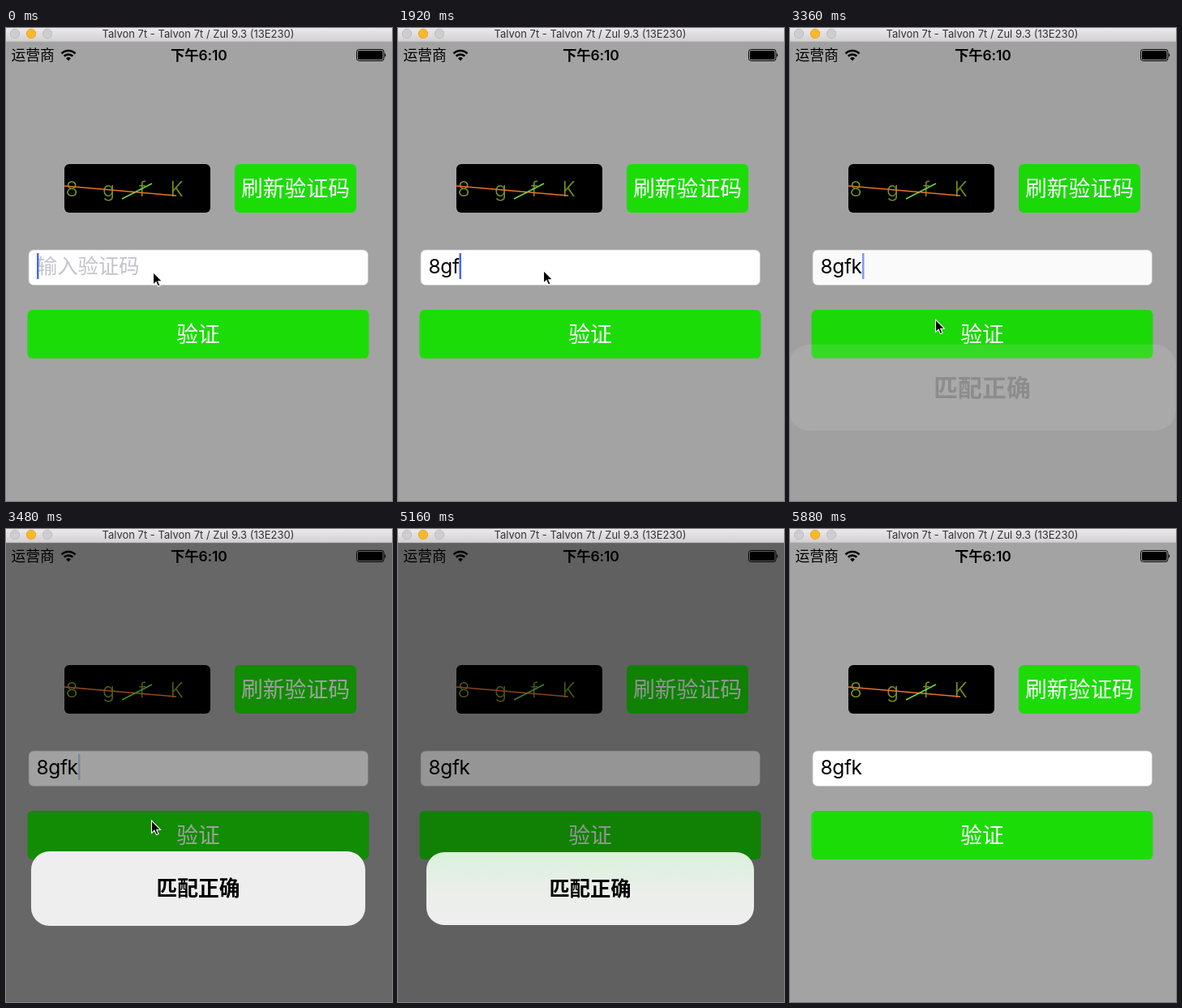
An HTML page for the animation above (6000 ms loop, 476 px wide and 584 px high).

```html
<!DOCTYPE html>
<html lang="zh-CN">
<head>
<meta charset="utf-8">
<title>验证码</title>
<style>
  html, body { margin: 0; width: 100%; height: 100%; overflow: hidden; background: #a3a3a3; }
  svg { display: block; width: 476px; height: 584px; }
  text { font-family: Inter, "Noto Sans CJK SC", "Noto Sans CJK", sans-serif; }
  .mid { text-anchor: middle; }
  .btn { fill: #1cdc08; }
  .label { font-size: 26.8px; font-weight: 300; fill: #fff; }
  .code { font-size: 25px; font-weight: 300; fill: #76951a; }
  .status { font-size: 17.8px; }
</style>
</head>
<body>
<svg viewBox="0 0 476 584">
  <defs>
    <linearGradient id="bar" x2="0" y2="1">
      <stop stop-color="#ebe9eb"/><stop offset="1" stop-color="#d2d0d2"/>
    </linearGradient>
    <linearGradient id="frost" x2="0" y2="1">
      <stop stop-color="#d9f1da"/><stop offset=".55" stop-color="#ebeeeb"/><stop offset="1" stop-color="#eeeeee"/>
    </linearGradient>
  </defs>

  <rect width="476" height="584" fill="#a3a3a3"/>

  <!-- status bar -->
  <text class="status" x="6.5" y="40">运营商</text>
  <g fill="none" stroke="#000" stroke-width="2.6">
    <path d="M68.5 31.5a12 12 0 0 1 17 0M71.7 34.8a7.6 7.6 0 0 1 10.6 0"/>
    <path d="M77 40.5l-2.9-3.1a4.2 4.2 0 0 1 5.8 0z" fill="#000" stroke="none"/>
  </g>
  <text class="status" x="203" y="40" font-weight="600" style="font-size:17.5px" letter-spacing="-.2">下午6:10</text>
  <rect x="432.5" y="26.5" width="33.5" height="14" rx="3" fill="none" stroke="#000"/>
  <rect x="434" y="28" width="30.5" height="11" rx="1.5"/>
  <path d="M467 31q2.5 2.5 0 5z"/>

  <!-- captcha -->
  <rect x="72" y="168" width="180" height="60" rx="6"/>
  <g class="code">
    <text x="73.5" y="208">8</text><text x="119" y="208">g</text>
    <text x="164" y="208">f</text><text x="202.5" y="208">K</text>
  </g>
  <path d="M72 195L210 207" stroke="#e8742c" stroke-width="1.5"/>
  <path d="M143 211L180 192" stroke="#70d845" stroke-width="1.5"/>

  <!-- form -->
  <rect class="btn" x="282" y="168" width="150" height="60" rx="6"/>
  <text class="label mid" x="357" y="208">刷新验证码</text>
  <rect x="28" y="274" width="418.5" height="43.5" rx="6" fill="#fff" stroke="#c4c4c4" stroke-width=".7"/>
  <text id="hint" x="38" y="303" font-size="25.3" font-weight="300" fill="#c3c3c9">输入验证码</text>
  <text id="entry" x="37.5" y="303.3" font-size="24.5" letter-spacing="-.4"></text>
  <rect id="caret" y="278" width="2.5" height="32" fill="#426bf2"/>
  <rect class="btn" x="26.5" y="348" width="421" height="60" rx="6"/>
  <text class="label mid" x="237" y="388">验证</text>

  <rect id="dim" y="17" width="476" height="567" opacity="0"/>
  <g id="alert" opacity="0">
    <rect id="panel" x="35" y="399" width="404" height="90" rx="22"/>
    <text class="mid" x="237" y="453" font-size="25.3" font-weight="600">匹配正确</text>
  </g>

  <!-- window title bar -->
  <rect width="476" height="17" fill="url(#bar)"/>
  <rect y="16.5" width="476" height=".7" fill="#b4b2b4"/>
  <g fill="#cfcdcf" stroke="#b8b6b8" stroke-width=".8">
    <circle cx="11" cy="7" r="5.7"/>
    <circle cx="31" cy="7" r="5.7" fill="#fdb827" stroke="#dd9d24"/>
    <circle cx="51" cy="7" r="5.7"/>
  </g>
  <text class="mid" x="237" y="12" font-size="13" fill="#333">Talvon 7t - Talvon 7t / Zul 9.3 (13E230)</text>

  <path id="pointer" d="M0 0V15.5L3.6 12.2L6 17.6L8.6 16.5L6.2 11.2H11Z" stroke="#fff" stroke-width="1.1"/>
</svg>
<script>
const LOOP = 6000, STEP = 120;
const $ = id => document.getElementById(id);
const [hint, entry, caret, dim, alertBox, panel, pointer] =
  ['hint', 'entry', 'caret', 'dim', 'alert', 'panel', 'pointer'].map($);

// [time, text, caret x]
const typing = [
  [0, '', 38], [720, '8', 53], [1200, '8g', 68], [1800, '8gf', 75.5], [2160, '8gfk', 89]
];
// [time, x, y]
const path = [
  [0, 181.5, 301.5], [1440, 181.5, 301.5], [1800, 179.5, 299.5], [2160, 179.5, 299.5],
  [2520, 179.5, 360], [3480, 179.5, 360], [3840, 181.5, 350], [3960, 181.5, 350], [4320, 190, -30]
];
// [time, dim, opacity, scale, fill]
const popup = [
  [0, 0, 0, 1, '#eee'], [3360, .02, .12, 1.182, '#eee'], [3480, .37, 1, 1.02, '#eee'],
  [3600, .415, 1, 1, 'url(#frost)'], [5280, 0, 0, 1, '#eee']
];
// caret opacity per step of its blink
const blink = [1, 1, .65, .3, 0, 0, .4, .8];

const latest = (rows, t) => rows.filter(row => row[0] <= t).pop();

function along(rows, t) {
  const a = latest(rows, t), b = rows.find(row => row[0] > t) || a;
  const k = a === b ? 0 : (t - a[0]) / (b[0] - a[0]);
  return [1, 2].map(i => a[i] + (b[i] - a[i]) * k);
}

function caretOpacity(t, typedAt) {
  if (t >= 3600 && t < 5400) return 0;
  const start = t < 5400 ? typedAt : 5400;
  return blink[(t - start) / STEP % blink.length];
}

function draw() {
  const t = Math.floor(performance.now() % LOOP / STEP) * STEP;

  const [typedAt, text, caretX] = latest(typing, t);
  hint.style.display = text ? 'none' : '';
  entry.textContent = text;
  caret.setAttribute('x', caretX);
  caret.setAttribute('opacity', caretOpacity(t, typedAt));

  const [, shade, opacity, scale, fill] = latest(popup, t);
  dim.setAttribute('opacity', shade);
  alertBox.setAttribute('opacity', opacity);
  alertBox.setAttribute('transform', `translate(237 444) scale(${scale}) translate(-237 -444)`);
  panel.setAttribute('fill', fill);

  pointer.setAttribute('transform', `translate(${along(path, t)})`);
  requestAnimationFrame(draw);
}
draw();
</script>
</body>
</html>
```
